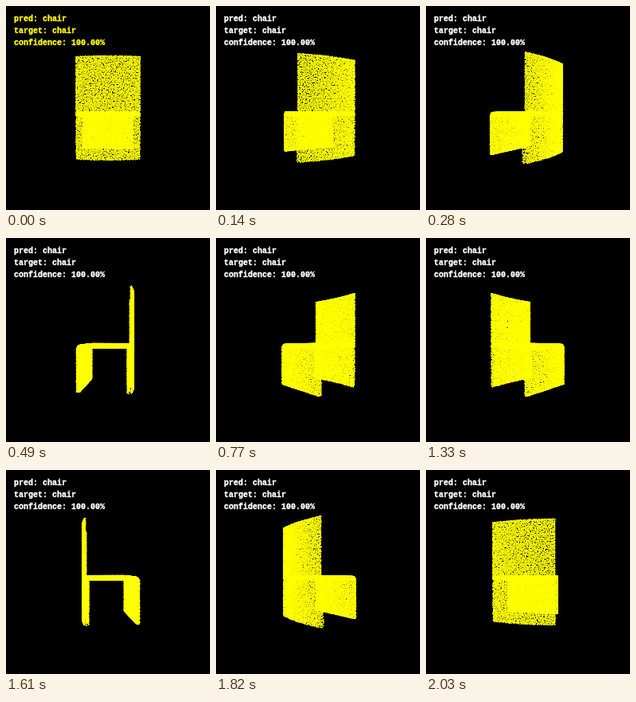
Write an HTML page with a canvas that moves like this. It is 256 px wide and 256 px high and loops after 2.1 s.

```html
<!DOCTYPE html>
<html lang="en">
<head>
<meta charset="utf-8">
<title>Point cloud prediction</title>
<style>
  html, body { margin: 0; width: 256px; height: 256px; overflow: hidden; background: #000; }
  canvas, svg { position: absolute; left: 0; top: 0; display: block; }
  svg { color: #fff; }
  text {
    font: bold 10px "Liberation Mono", "Courier New", monospace;
    white-space: pre;
    fill: currentColor;
    stroke: currentColor;
    stroke-width: 0.35px;
  }
</style>
</head>
<body>
<canvas id="cloud" width="256" height="256"></canvas>
<svg id="label" width="256" height="256">
  <text x="10" y="19">pred: chair</text>
  <text x="10" y="34">target: chair</text>
  <text x="10" y="49">confidence: 100.00%</text>
</svg>
<script>
const SIZE = 256, MID = SIZE / 2;
const STEPS = 30, STEP_MS = 70;
const CAMERA = 233;      // camera distance; one unit is one pixel at the centre
const RADIUS = 1.15;     // splat radius in pixels
const SPACING = 1.5;

const HALF_W = 35.2, HALF_H = 56.6;
const SEAT_Y = 5.2, SEAT_THICK = 3.5;
const FRONT_Z = 30.8, BEND = 5;
const BACK_Z = -28.5, BULGE = 3.5;
const BACK_THICK = 1, BASE_THICK = 4.5;

let seed = 7;
function random() {
  seed = (seed * 1664525 + 1013904223) >>> 0;
  return seed / 4294967296;
}

const points = [];

// Fills an area with one point per grid cell, at a random place in the cell.
function scatter(width, height, place) {
  const cols = Math.ceil(width / SPACING);
  const rows = Math.ceil(height / SPACING);
  for (let r = 0; r < rows; r++) {
    for (let c = 0; c < cols; c++) {
      points.push(place((c + random()) / cols * width, (r + random()) / rows * height));
    }
  }
}

// Covers a bent board: both faces, both sides and both ends.
// profile maps x, distance s and depth t (0 outside, 1 inside) to [y, z].
function addBoard(length, thick, profile) {
  const at = (x, s, t) => [x, ...profile(x, s, t)];
  for (const side of [0, 1]) {
    scatter(2 * HALF_W, length, (u, s) => at(u - HALF_W, s, side));
    scatter(thick, length, (t, s) => at((2 * side - 1) * HALF_W, s, t / thick));
    scatter(2 * HALF_W, thick, (u, t) => at(u - HALF_W, side * length, t / thick));
  }
}

function backrest(x, s, t) {
  const y = s - HALF_H;
  const thick = y < SEAT_Y ? BACK_THICK : BASE_THICK;
  return [y, BACK_Z - BULGE * (1 - (x / HALF_W) ** 2) + t * thick];
}

const seatLength = FRONT_Z - BEND - BACK_Z;
const arcLength = BEND * Math.PI / 2;
const legLength = HALF_H - SEAT_Y - BEND;

function seatAndFront(x, s, t) {
  const inset = t * SEAT_THICK;
  if (s < seatLength) return [SEAT_Y + inset, BACK_Z + s];
  s -= seatLength;
  if (s < arcLength) {
    const a = s / BEND, r = BEND - inset;
    return [SEAT_Y + BEND - r * Math.cos(a), FRONT_Z - BEND + r * Math.sin(a)];
  }
  return [SEAT_Y + BEND + s - arcLength, FRONT_Z - inset];
}

addBoard(2 * HALF_H, BACK_THICK, backrest);
addBoard(seatLength + arcLength + legLength, SEAT_THICK, seatAndFront);

const ctx = document.getElementById("cloud").getContext("2d");
const label = document.getElementById("label");
const image = ctx.createImageData(SIZE, SIZE);
const clear = new Float32Array(SIZE * SIZE);

// Each splat fades towards its rim and multiplies the light let through.
function splat(x, y) {
  for (let py = Math.ceil(y - RADIUS - 0.5); py + 0.5 < y + RADIUS; py++) {
    for (let px = Math.ceil(x - RADIUS - 0.5); px + 0.5 < x + RADIUS; px++) {
      const d = ((px + 0.5 - x) ** 2 + (py + 0.5 - y) ** 2) / RADIUS ** 2;
      if (d < 1) clear[py * SIZE + px] *= d;
    }
  }
}

function draw(step) {
  const angle = step / STEPS * 2 * Math.PI;
  const cos = Math.cos(angle), sin = Math.sin(angle);
  clear.fill(1);
  for (const [x, y, z] of points) {
    const scale = CAMERA / (CAMERA + x * sin + z * cos);
    splat(MID + (x * cos - z * sin) * scale, MID + y * scale);
  }
  for (let i = 0; i < clear.length; i++) {
    const level = 255 * (1 - clear[i]);
    image.data[4 * i] = image.data[4 * i + 1] = level;
    image.data[4 * i + 3] = 255;
  }
  ctx.putImageData(image, 0, 0);
  label.style.color = step ? "#fff" : "#ff0";
}

const start = performance.now();
let shown = -1;
function tick() {
  const step = Math.floor((performance.now() - start) / STEP_MS) % STEPS;
  if (step !== shown) draw(shown = step);
  requestAnimationFrame(tick);
}
tick();
</script>
</body>
</html>
```
